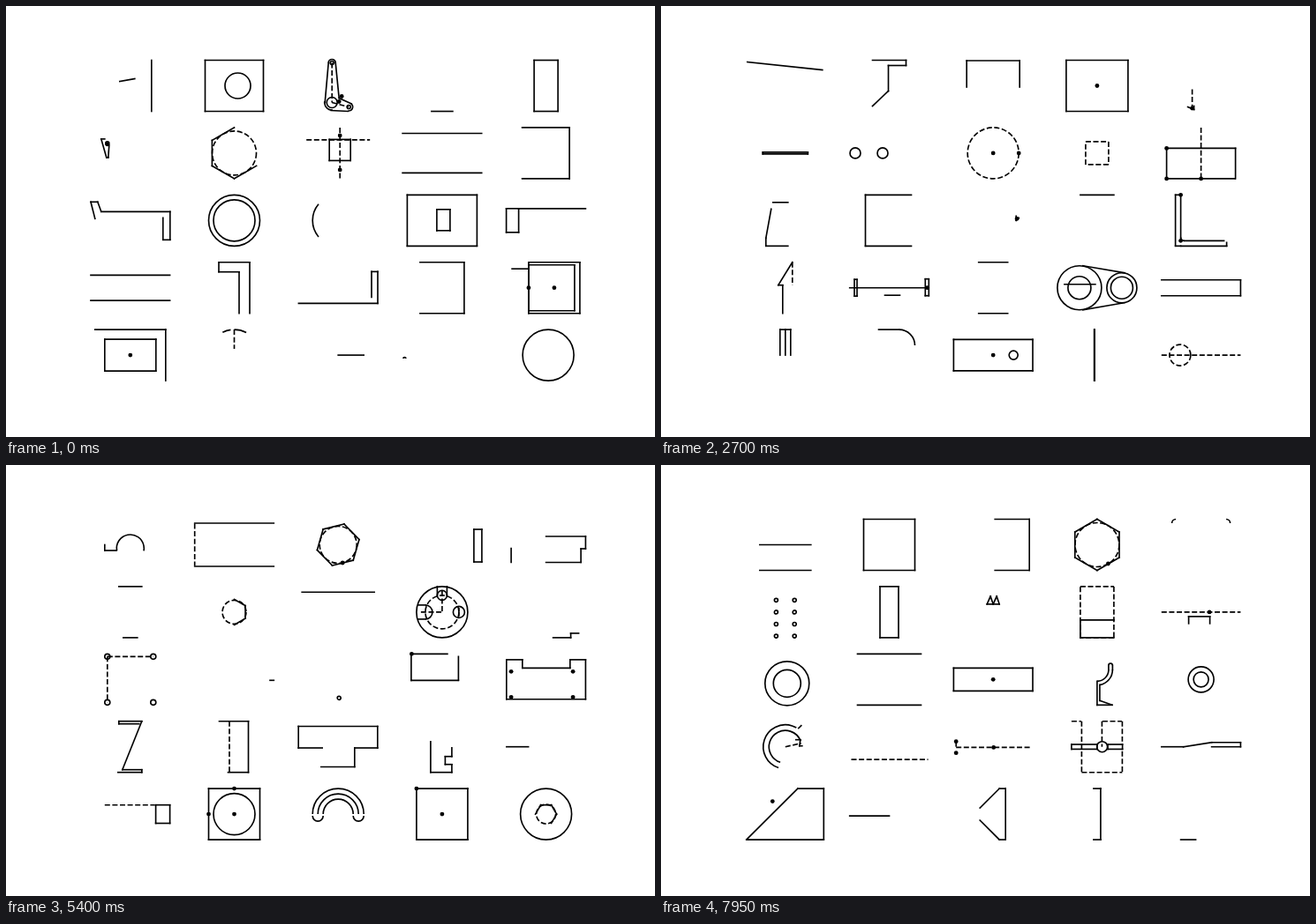
Animation of 735 by 489 pixels, one loop 8000 ms. Source, as an HTML page with a canvas:

```html
<!DOCTYPE html>
<html lang="en">
<head>
<meta charset="utf-8">
<title>Sketches drawn stroke by stroke</title>
<style>
html, body { margin: 0; width: 100%; height: 100%; overflow: hidden; background: #fff; }
canvas { display: block; }
</style>
</head>
<body>
<canvas id="stage" width="735" height="489"></canvas>
<script>
const STEP = 150, LOOP = 8000;
const KEYS = [0, 6, 14, 23, 36, 43, 53]; // step at which each sketch of a cell is finished
const W = 44.8, M = 29;                  // half width and half height of a cell
const g = document.getElementById('stage').getContext('2d');
const rad = a => a * Math.PI / 180;

// Every helper returns a list of strokes in cell coordinates, centre at 0, 0.
const line = (x, y, x2, y2) => [{ x, y, x2, y2 }];
const h = (y, x, x2) => line(x, y, x2, y);
const v = (x, y, y2) => line(x, y, x, y2);
const arc = (r, a, b, x = 0, y = 0) => [{ r, a, b, x, y }];
const ring = (r, x, y) => arc(r, 0, 360, x, y);
const dot = (x = 0, y = 0) => [{ fill: true, r: 2.4, a: 0, b: 360, x, y }];
const bars = (w, t, x = 0, y = 0) => [...h(y - t, x - w, x + w), ...h(y + t, x - w, x + w)];

function path(...p) {
  const list = [];
  for (let i = 0; i + 3 < p.length; i += 2) list.push(...line(...p.slice(i, i + 4)));
  return list;
}

// Right-angled path: moves go across, down, across, ...
function step(x, y, ...moves) {
  const list = [];
  moves.forEach((d, i) => {
    const x2 = i % 2 ? x : x + d, y2 = i % 2 ? y + d : y;
    if (d) list.push(...line(x, y, x2, y2));
    x = x2; y = y2;
  });
  return list;
}

const box = (w, t, x = 0, y = 0) => step(x - w, y - t, 2 * w, 2 * t, -2 * w, -2 * t);

function poly(n, r, turn, sides = n) {
  const p = [];
  for (let i = 0; i <= sides; i++) {
    const a = rad(turn + i * 360 / n);
    p.push(r * Math.cos(a), r * Math.sin(a));
  }
  return path(...p);
}

const around = (n, r, turn, make) => Array.from({ length: n }, (_, i) => {
  const a = rad(turn + i * 360 / n);
  return make(r * Math.cos(a), r * Math.sin(a));
}).flat();

const dash = (...parts) => parts.flat().map(s => ({ ...s, dashed: true }));
const both = (...parts) => parts.flat().concat(parts.flat().map(s =>
  ({ ...s, x: -s.x, x2: -s.x2, a: 180 - s.b, b: 180 - s.a })));
const twice = (dx, dy, ...parts) => parts.flat().concat(parts.flat().map(s =>
  ({ ...s, x: s.x + dx, y: s.y + dy, x2: s.x2 + dx, y2: s.y2 + dy })));

const cells = [];
let now;
function cell(col, row) {
  now = { x: 140.8 + 117.7 * col, y: 90.5 + 76.4 * row, sketches: [] };
  cells.push(now);
}
// draw() starts a new sketch in the cell, more() adds strokes to the last one.
function add(list, least) {
  const i = now.sketches.length, key = KEYS[i];
  const first = i ? KEYS[i - 1] + 1 : 0;
  const start = least ? first : Math.max(first, Math.min(key, key - list.length + 1));
  now.sketches.push({ list, least, key, start });
}
const draw = (...parts) => add(parts.flat(), 0);
function more(...parts) {
  const { list } = now.sketches[now.sketches.length - 1];
  add(list.concat(parts.flat()), list.length);
}

cell(0, 0);
draw(v(24, -M, M), line(-12, -5, 5, -8));
draw();
draw(step(W, 4, -2 * W, 9, 2 * W));
draw(path(-43, -27, 42, -18, 18, M, -43, -27), ring(8, 10, -5), ring(5, 18, 13), arc(5.5, 5, 185, -6, -24));
draw(step(-M, 0, 0, 6.5, 13), arc(15.5, 169, 371, 0, 4));
draw(box(W, 27));
draw(h(0, -M, M), h(M, -M, M));

cell(1, 0);
draw(box(33, M), ring(14.5, 4));
draw(box(4.5, 4, -41), h(4, 36, W));
draw(step(-19, -M, 38, 6, -20, M), line(-1, 6, -19, 23));
draw(bars(4.5, 15.5, -12, -1));
draw(bars(W, 24.5), dash(v(-W, -24, 24)));
draw(step(-2, -M, 6.5, 20, -6, M, 16.5));
draw(box(M, M));

cell(2, 0);
draw(ring(2, -7, -26), arc(4, 180, 360, -7, -26), line(-11, -26, -15, 19), path(-3, -26, 1, 14, 15, 20.5),
  ring(6, -7, 19), arc(8.5, 85, 190, -7, 19), line(-8, 28, 11, M), arc(4.5, -60, 100, 12, 24), ring(2, 12, 24),
  dash(path(-7, -26, -7, 19, 12, 24)), dot(4, 12), dot(1, 18));
draw(box(4, 4.5, -41, -3), dot(-41, -3), v(0, -4, 6));
draw(step(-30, 1.5, 0, -30, 60, 30));
draw(v(-M, -M, M));
draw(poly(6, 24.5, -74), dash(ring(21)), dot(5, 20.5));
draw(dash(v(0, -M, M)), ring(9.5, 0, -14), dot(9, -14), v(0, -23, -5));
draw(step(2, -M, 39, 2 * M, -39));

cell(3, 0);
draw(h(M, -12, 12));
draw(line(-5, -3, -1, -4), h(12, -6, 0));
draw(box(35, M), dot());
draw(step(5, -M, 0, 2 * M, -13, -4), arc(15, 118, 243, 4, 1));
draw(box(4.5, 18.5, 40.5, 1));
draw(v(-17, -M, 12), arc(17, 0, 180, 0, 12));
draw(poly(6, M, -90), dash(ring(25)), dot(12.5, 21.5));

cell(4, 0);
draw(box(13.5, M));
more(box(8.5, 24), v(-6.5, -24, 21), h(21, -8, 8));
draw(dash(v(-10, 4, 24)), path(-15, 24, -8, 27, -8, 23), dot(-10, 25.5));
more(arc(24, 97, 176, -5, 3.5), dot(-M, 5.5), dot(-8, 26));
draw(v(-39.5, 4, 20), step(0, -9.5, W, 14, -5.3, 15.5, -39.5));
more(step(0, -9.5, -W, 14, 5.3), h(20, -39.5, 0), step(-39.5, -9.5, 0, -11, 79, 11));
draw(both(arc(4.5, 180, 270, -28.5, -24.5)));

cell(0, 1);
draw(path(-M, -16, -33, -16, -27, 5, -25, 5, -24, -9), ring(2, -26, -11), dot(-26, -10));
draw(box(13.5, M));
draw(box(25.5, 1));
draw(path(-9, -18, 14, -3, 16, 25));
draw(h(-M, -13, 13), h(M, -8, 8));
draw(step(-34, M, 0, -2 * M, 68, M), dash(h(0, 34, 0)));
draw(both(twice(0, 27.2, twice(0, 13.6, ring(2, 10.4, -13.6)))));

cell(1, 1);
draw(dash(ring(25)), poly(6, M, 30, 4));
draw(ring(10.5, 34.5), ring(3, 34.5), dot(34.5));
draw(dash(both(line(-21.5, -M, 21.5, M))), bars(.5, M), dot());
draw(ring(6, -38.5), ring(6, -7.5), bars(15.5, 6, -23), ring(6, 7.5), ring(6, 38.5), h(-6, 8, 38));
draw(dash(ring(13.5)), poly(6, 14.5, -90, 3));
draw(ring(16.5), ring(11));
draw(box(10.5, M));

cell(2, 1);
draw(box(12, 12, 2, -3.5), dash(h(-15, -36, 36), v(2, -M, M)), dot(2, -20), dot(2, 19));
draw(dash(h(6.5, -W, 43)), ring(6.5, -30, 6.5), ring(6.5, -3, 6.5), v(-28.5, -12, 6));
more(twice(27, 0, v(-32, -12, 6), v(-28.5, -12, 6), arc(1.7, 180, 360, -30.2, -12), h(6, -32, -28)));
draw(dash(ring(M)), dot(), around(6, M, 0, dot));
draw(h(-22.7, -41, 41));
more(step(-41, -22.7, 0, 45.5, 82, -45.5), box(W, 27));
draw(path(-7, -9, -3, -18, 0, -9, 4, -18, 7, -9, -7, -9));

cell(3, 1);
draw(bars(W, 22.4));
more(both(v(W, -22, 22)), dash(box(39, 17)));
draw(step(-M, M, 2 * M, -4, -54, -54, -4, 2 * M));
draw(dash(box(13, 13), both(line(-20, -M, 20, M))), dot(), both(dot(9.5, -13)));
draw(ring(M), dash(ring(19), v(0, -24, 0), h(0, -24, 0)), ring(5.5, 0, -19), both(v(5.5, -M, -19)),
  arc(8, -90, 90, -19), bars(4, 8, -23), ring(6.5, 19), v(19, -4, 4));
draw(bars(W, 21.4));
draw(dash(box(19, M)), step(-19, M, 0, -20, 38), h(M, -19, 19));

cell(4, 1);
draw(step(-27, -M, 53.5, 2 * M, -53.5));
draw(h(M, -38.5, 38.5));
more(step(-39, M, 0, -34.5, 78, 34.5), dash(v(0, -M, M)), dot(-39, -5.5), dot(-39, M), dot(0, M));
draw(box(10, 10.5, -35, -1), h(-11.5, 25, W));
draw(step(8, M, 20, -5, 9));
draw(h(-8.4, -W, 0));
draw(dash(h(0, -W, W)), dot(9.5), step(-14, 13, 0, -8, 24, 8));

cell(0, 2);
draw(path(-40, -2, -W, -21, -37, -21, -33, -10), step(-33, -10, 78, 32, -8, -25));
draw(dash(ring(25)), poly(6, M, 30, 4));
draw(h(-20.5, -14, 3), path(-16, -13, -22, 20, -22, M, 3, M));
draw(poly(4, M, -90));
draw(twice(0, 52, both(ring(3, 26, -26))), dash(h(-26, -26, 26), v(-26, -26, 26)));
draw(ring(4.5, -21, 2.5), path(-10, -6, -25, -8, -30, -3, -30, 7, -26, 11, -8, 11));
draw(ring(25, 2, 4.5), ring(15.5, 2, 4.5));

cell(1, 2);
draw(ring(M), ring(23.5));
more(ring(17), v(4, -M, -23), v(-3, 23, M), h(3, 23, M), dot(-26, -3));
draw(step(25, -M, -52, 2 * M, 52));
draw(path(-22, -25, -43, -M, -43, M), path(13, 24, 43, 22, 43, -10));
draw(h(1, 40.5, W));
more(step(40.5, 1, 0, -2.5, 4, 2.5), step(-41, -1.5, -4, 2.5, 4));
draw(bars(36, M));

cell(2, 2);
draw(arc(M, 140, 220));
draw(v(26, -5, 0), line(26, -3, 28, -2));
more(dot(27, -2), line(26, 0, M, -3));
draw(v(-9, -21, -3));
draw(ring(2, 1, 21));
more(twice(0, -47, ring(3.3, 1, 21), ring(2, 1, 21), ring(2, -2, 26)));
draw(box(W, 13), dot());

cell(3, 2);
draw(box(39.5, M), box(7.5, 12, 1.5, -.5));
draw(box(11.5, 23, -10.5, 6), dot(-10, 6), line(1, -17.5, 22, -M));
draw(path(2, 7, 2, -13, -W, 8, -W, 13, -2, -7, -2, 13));
draw(box(19, M), ring(9, 0, -10), dot(-11, -21));
draw(step(6, -M, -41, 30, 53.5, -27), dot(-34.5, -M));
draw(arc(13.5, 0, 180, 0, 3), both(path(13.5, 3, 13.5, -3, 18, -12)), dash(path(-16, -9, 0, 3, 16, -9)));
draw(path(0, 2, 0, M, 17, M, 3, 24, 3, 6), arc(13, 0, 90, 0, -11), arc(17.5, 0, 80, 0, -11),
  v(13, -16, -11), v(17.5, -16, -11), arc(2.2, 180, 360, 15.2, -16));

cell(4, 2);
draw(box(7, 13.5, -38), h(-13.5, -31, W));
draw(step(-23, -M, -6, 2 * M, 6));
more(v(-23, -M, 21), step(-23, M, 52, -4), h(23, -19, 26), arc(4, 90, 180, -19, 19), dot(-23, -M), dot(-23, 23));
draw(dash(ring(M)), around(3, M, 90, dot));
draw(step(-W, -22.4, 18, 9.4, 54, -9.4, 17.6, W, -2 * W, -W), twice(0, M, dot(-39.5, -9), dot(30.5, -9)));
draw(bars(8.5, 3.5, 0, -25.5), box(8.5, 3.5, 0, 25.5), dot(0, 25.5));
draw(ring(14.5), ring(8.5));

cell(0, 3);
draw(bars(W, 14.4));
draw(dash(ring(M), path(0, -M, 0, 0, -33, 18)));
draw(path(-3, M, -3, -3, -8, -3, 8, -M), dash(v(8, -M, -3)));
draw(step(-5, -20.5, 50, 35));
draw(path(10, -26, -13, -26, -13, -M, 13, -M, -9, 26, 13, 26, 13, M, -14, M));
draw(box(9, 18, -35.8, 10.5), bars(9.5, 18, 35.5, -10.5));
draw(arc(25, 108, 300), arc(18.5, 108, 340), dash(line(0, 0, 18, -4)),
  path(12, -8, 17, -8, 16, -1, 19, -1), line(15, -21, 18, -24));

cell(1, 3);
draw(step(17.5, M, 0, -2 * M, -35, 11, 23, 47));
draw(h(8.5, -5, 12), step(W, -10, -4, 19, 4));
more(v(W, -10, 9), h(0, -W, W), box(1.5, 9.5, -38), dot(43));
draw(box(M, M));
draw(step(-17, -M, 33, 2 * M, -23), dash(v(-5.5, -M, M)));
draw(step(-39.5, -16, 0, 45, 76), line(-17, -26, 39, 21), dot(-39.5, M));
draw(dash(h(14.4, -43, 44)));

cell(2, 3);
draw(step(-W, 17.7, 2 * W, -36, -7, M));
draw(bars(M, 17.5));
draw(bars(16.5, M));
draw(path(-10, -14, -27, -10, -31, 25, 32, M), line(6, 3, 24, 21), line(13, 11, 30, -4));
draw(step(-18, 1.3, -27, -24.5, 2 * W, 24.5, -26, 21.5, -38));
draw(box(1.7, 8, -.5, -21), v(-1.7, -13, M), v(-.7, -13, M));
draw(dash(h(.7, -42, 43)), dot(.5, .7), dot(-42, -6), dot(-42, 7), dash(v(-42, -6, 0)));

cell(3, 3);
draw(step(-25, -M, 50, 2 * M, -50));
draw(box(12, M));
draw(ring(25, -20), ring(13, -20), ring(17, 28), ring(12.5, 28),
  line(-16, -25, 31, -17), line(-16, 25, 31, 17), h(-4, -37, -2));
draw(box(W, M), dot());
draw(step(-13, -6, 0, 35, 24, -9, -7.5, -9, 7.5, -10));
draw(dash(step(-17.5, -M, 0, 2 * M, 46), v(28.5, -M, -6), v(28.5, 5, M)));
more(dash(h(-M, -M, -18), v(5.5, -M, 0), h(-M, 6, 28)), box(14.5, 2.7, -14.5), box(8.3, 2.7, 20.4), ring(6, 5.7));

cell(4, 3);
draw(box(M, M, 9.3), box(26, 26, 6.3), dot(-19.7), dot(9.3), h(-21.5, -38.5, -20));
draw(ring(10.5, -34.5), ring(8.5, 36));
draw(step(-W, -9, 2 * W, 18, -2 * W));
draw(dash(v(1.5, -M, M)));
draw(h(0, -W, -20));
more(path(-20, 0, 12, -5, W, -5, W, 0, 12, 0, -20, 5, -W, 5, -W, 0));
draw(path(-W, 0, -20, 0, 12, -5, W, -5, W, 0, 12, 0));

cell(0, 4);
draw(box(M, 18), dot(), step(-40, -M, 80, 2 * M));
draw(path(-32, 8, -W, -5, W, -5, W, 10.5, -25, 10.5));
draw(step(-6, 0, 0, -M, 12, M), v(0, -M, 0));
draw(dash(h(0, -44, 43)));
draw(dash(h(-10.4, -M, 28)), box(8, 10.4, 36.8));
draw(bars(3, 1, 20.5, -21.3));
draw(path(-44, M, 43.5, M, 43.5, -M, 14, -M, -44, M), dot(-14.5, -14.5));

cell(1, 4);
draw(arc(M, -117, -98), arc(M, -90, -62), dash(v(0, -M, -7)));
draw(bars(42, 3.2));
more(box(1, 3, -44.3), box(1, 3, 44.3));
draw(h(-M, -12, 11), arc(18, -90, 0, 11, -11), v(M, -11, 12), v(-M, -12, 12), h(M, -12, 12), both(dot(M, -M)));
draw(box(M, M), ring(23.5), dot(), dot(-M), dot(0, -M));
draw(box(20, 2.8, -24.8, -24.4), step(W, -9.7, -7, 37, 7));
draw(h(2, -W, 0));

cell(2, 4);
draw(h(0, 0, M));
more(ring(M), h(0, -M, 0), path(0, 0, 0, -6, M, 0), h(3.5, -6, 0));
draw(box(W, 17.8), dot(), ring(5, 23));
draw(arc(8, 180, 360, -21, -21), h(-21, -M, -24), h(-21, -18, -13));
draw(arc(M, 180, 360), arc(23, 180, 360), arc(17, 180, 360), both(arc(6, 0, 180, 23, 2)));
draw(dot(), around(6, 26.4, -90, (x, y) => ring(2.5, x, y)));
draw(path(-15, -7, 7, -M, 14, -M, 14, M, 7, M, -15, 7));

cell(3, 4);
draw(arc(1.5, 180, 360, -42.5, 4));
draw(bars(20.5, 17, 20.5, -12));
draw(v(-3.3, -M, M), v(-2.8, -M, M));
draw(dash(ring(M)));
draw(box(M, M), dot(-M, -M), dot());
draw(ring(14.5, -30.3), ring(14.5), ring(14.5, 30.3), dash(h(0, 0, 30)));
draw(step(-4, -M, 8, 2 * M, -8));

cell(4, 4);
draw(ring(M, 2.5));
draw(path(-4, -26, 1, -24, 1, 24));
draw(step(-35, -M, 70, 2 * M, -70));
draw(dash(h(0, -W, W), ring(12, -23.7), ring(12, 23.7), v(-23.7, -12, 12)), dot(-35.7), dot(-23.7, -12), dot(-23.7, 12));
draw(ring(M), dash(ring(11)), poly(6, 12, 180, 4));
draw(ring(23), ring(2.3, 0, -26.5), ring(2.3, -26.7));
draw(h(M, -23, -6));

function stroke(s) {
  g.setLineDash(s.dashed ? [6, 2.6] : []);
  g.lineCap = s.dashed || s.r ? 'butt' : 'square';
  g.beginPath();
  if (s.r) g.arc(s.x, s.y, s.r, rad(s.a), rad(s.b));
  else { g.moveTo(s.x, s.y); g.lineTo(s.x2, s.y2); }
  if (s.fill) g.fill(); else g.stroke();
}

function render(time) {
  const at = Math.floor(time % LOOP / STEP);
  g.setTransform(1, 0, 0, 1, 0, 0);
  g.fillStyle = '#fff';
  g.fillRect(0, 0, 735, 489);
  g.fillStyle = g.strokeStyle = '#000';
  g.lineWidth = 1.65;
  for (const { x, y, sketches } of cells) {
    const s = sketches.filter(k => k.start <= at).pop();
    if (!s) continue;
    g.setTransform(1, 0, 0, 1, x, y);
    s.list.slice(0, Math.max(s.least, s.list.length + at - s.key)).forEach(stroke);
  }
}

const begin = performance.now();
function tick() {
  render(performance.now() - begin);
  requestAnimationFrame(tick);
}
tick();
</script>
</body>
</html>
```
